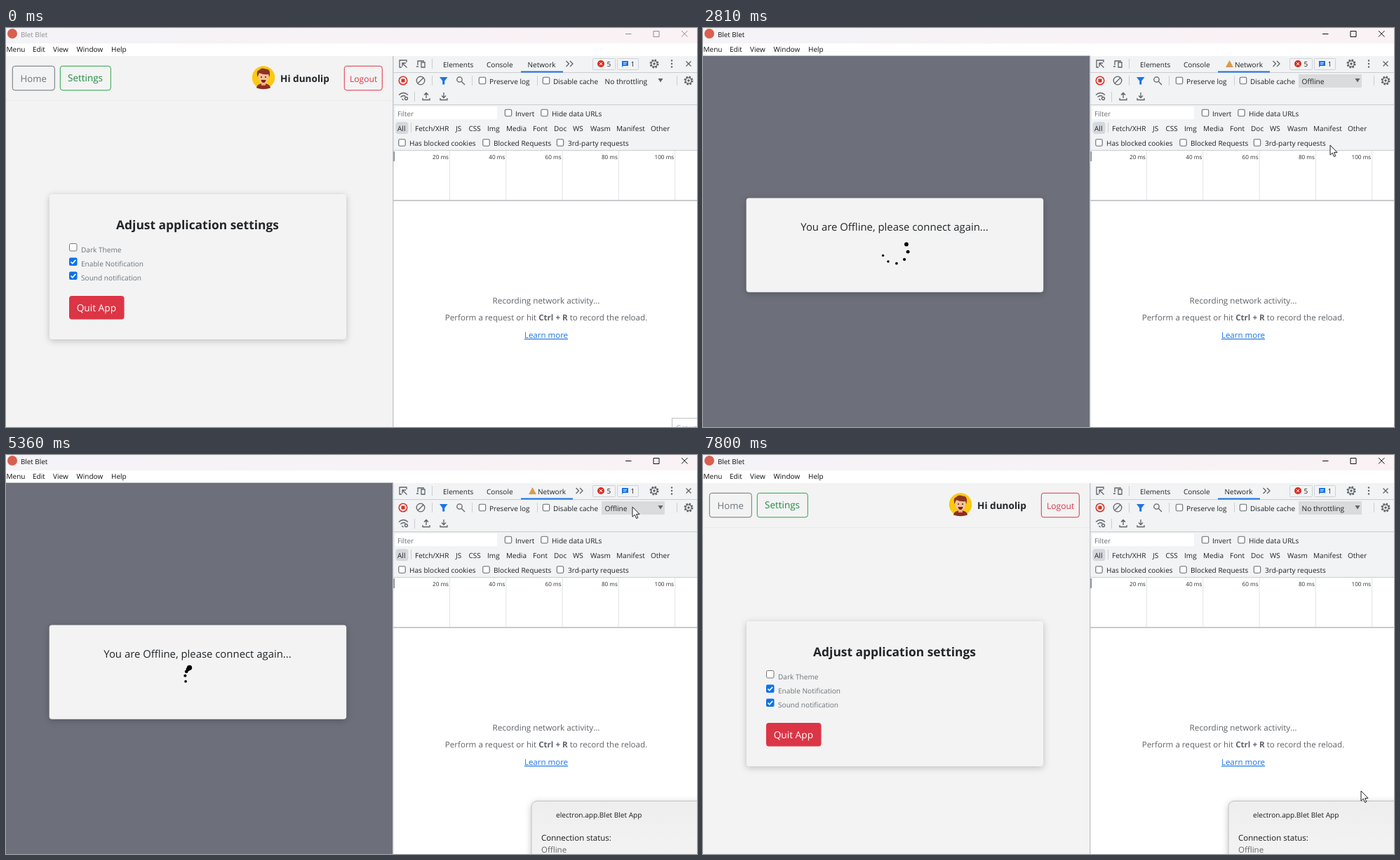
An HTML page that plays this animation: 985x569 px, repeating every 8000 ms.

```html
<!DOCTYPE html>
<html lang="en">
<head>
<meta charset="utf-8">
<title>Offline settings</title>
<style>
  html, body { margin: 0; width: 100%; height: 100%; overflow: hidden; background: #fff; }
  svg { display: block; width: 100vw; height: 100vh; }
  text { font-family: "Open Sans", "Noto Sans", sans-serif; text-rendering: geometricPrecision; white-space: pre; }
  .line { fill: none; stroke: #5f6368; stroke-width: 1.3; }
  .soft { filter: drop-shadow(0 2px 5px rgba(0, 0, 0, .22)); }
  .pop { filter: drop-shadow(0 11px 13px rgba(0, 0, 0, .27)); }
</style>
</head>
<body>
<svg id="stage" viewBox="0 0 985 569"></svg>
<script>
const LOOP = 8000;
const RED = '#dc3545', BLUE = '#1a73e8', INK = '#202124', GREY = '#5f6368';

const text = (x, y, size, str, fill = INK, extra = '') =>
  `<text x="${x}" y="${y}" font-size="${size}" fill="${fill}" ${extra}>${str}</text>`;
const rect = (x, y, w, h, fill, extra = '') =>
  `<rect x="${x}" y="${y}" width="${w}" height="${h}" fill="${fill}" ${extra}/>`;
const path = (d, extra = 'class="line"') => `<path d="${d}" ${extra}/>`;
const circle = (x, y, r, extra = 'class="line"') => `<circle cx="${x}" cy="${y}" r="${r}" ${extra}/>`;
const group = (id, body) => `<g id="${id}">${body}</g>`;
const BOLD = 'font-weight="700"', MID = 'text-anchor="middle"';

const button = (x, w, color) => rect(x + .3, 54.3, w, 34.5, 'none', `rx="3.5" stroke="${color}"`);
const box = (x, y, extra = '') => rect(x - 4.7, y - 4.7, 9.4, 9.4, '#fff', `rx="1.6" stroke="#666b70" stroke-width="1.1" ${extra}`);
const ticked = y => rect(90, y, 11.5, 11.5, '#0d72ea', 'rx="2"') +
  path(`M92.5 ${y + 6}l2.3 2.4l4.4 -5`, 'fill="none" stroke="#fff" stroke-width="1.6"');
const separator = (x, y) => rect(x, y - 7, 1, 14, '#cbcdd1');
const gear = (x, y) => circle(x, y, 5.4, `fill="none" stroke="${GREY}" stroke-width="2.2" stroke-dasharray="2.4 1.84"`) +
  circle(x, y, 4.2) + circle(x, y, 1.7, `fill="${GREY}"`);

function titleBar() {
  const menu = [['Menu', .5], ['Edit', 38], ['View', 67], ['Window', 100.5], ['Help', 150]];
  return rect(0, 0, 985, 22, 'url(#mica)') + rect(0, 22, 985, 18, '#fff') +
    circle(9, 8, 7, 'fill="#d9604f"') +
    group('caption', text(21, 12.5, 9.8, 'Blet Blet', 'currentColor') +
      path('M883 8.5h8.5M923 4.5h8v8h-8zM963 4l8.5 8.5m0-8.5l-8.5 8.5', 'fill="none" stroke="currentColor"')) +
    menu.map(([s, x]) => text(x, 34.3, 10, s, '#111')).join('');
}

function avatar() {
  return '<g transform="translate(367 71)">' + circle(0, -.5, 16.2, 'fill="#fbc90e"') +
    path('M-10 14.5Q-9 8 0 8T10 14.5Q0 18 -10 14.5Z', 'fill="#8f2d22"') +
    rect(-3, 4, 6, 7, '#e5a276') +
    path('M-7.5 -6Q-8 8 0 9Q8 8 7.5 -6Z', 'fill="#f6c29a"') +
    path('M-8.5 -1Q-11 -10 -6 -11Q-3 -15 3 -12.5Q11 -13 8.5 -1L7 -5Q0 -4 -6 -7Z', 'fill="#8c3422"') +
    circle(-3, -1, 1, 'fill="#4a261d"') + circle(3, -1, 1, 'fill="#4a261d"') +
    path('M-3.5 3H3.5Q3 7 0 7T-3.5 3Z', 'fill="#7c1f1c"') + '</g>';
}

function settingsPage() {
  const label = (y, s) => text(107, y, 10.1, s, '#6c757d');
  return rect(0, 40, 552, 529, '#f3f3f3') + rect(0, 103, 552, 1, '#eaeaea') +
    button(9, 60, '#6c757d') + text(20.5, 77, 13.2, 'Home', '#6c757d') +
    button(77, 72, '#28a745') + text(88, 76, 13.5, 'Settings', '#218a45') +
    avatar() + text(391, 76.5, 13.6, 'Hi dunolip', '#212529', BOLD) +
    button(482, 54, RED) + text(490, 77, 12.1, 'Logout', RED) +
    rect(62, 237, 423, 207, '#f3f3f3', 'rx="4" class="soft"') +
    text(273, 286.5, 17.4, 'Adjust application settings', '#212529', `${BOLD} ${MID}`) +
    rect(90.5, 307.5, 10.5, 10.5, '#fff', 'rx="2" stroke="#767676"') + ticked(327.5) + ticked(347.5) +
    label(319.5, 'Dark Theme') + label(340, 'Enable Notification') + label(360, 'Sound notification') +
    rect(90, 382, 78.5, 33.5, RED, 'rx="4"') + text(100.7, 404, 13.7, 'Quit App', '#fff');
}

function offlinePage() {
  const dots = Array.from({ length: 6 }, () => circle(0, 0, 2, 'class="dot"')).join('');
  return rect(0, 39.6, 552, 530, '#6d6f7b') +
    rect(61.7, 242.5, 423.5, 134.3, '#f3f3f3', 'rx="4" class="soft"') +
    text(273, 288.5, 14.9, 'You are Offline, please connect again...', '#212529', MID) + dots;
}

function devtools() {
  const row = (y, items) => items.map(([x, s]) => text(x, y, 10.05, s)).join('');
  const ticks = [20, 40, 60, 80, 100].map((ms, i) =>
    rect(632 + i * 80.3, 175, 1, 70, '#e2e3e5') + text(631 + i * 80.3, 187, 8.2, ms + ' ms', '#303134', 'text-anchor="end"'));
  const chevrons = x => path('M0 -4l4 4l-4 4M5.5 -4l4 4l-4 4', `class="line" transform="translate(${x} 51)"`);
  return rect(552, 40, 433, 529, '#fff') + rect(552, 40, 433, 135, '#f1f3f4') +
    rect(552, 63, 433, 1, '#cacdd1') + rect(552, 109, 433, 1, '#cacdd1') + rect(552, 174, 433, 1, '#cacdd1') +
    // tab strip
    path('M571 49v-3h-10v10h3M565 50l6.5 6.5M565 55v-5h5') +
    path('M588 55h-3M587 53v-6h9M592 49h5v7h-5z') + separator(607, 51) +
    row(55.5, [[623, 'Elements'], [685, 'Console']]) +
    group('tabOnline', text(743.5, 55.5, 10.05, 'Network') + rect(734, 61.5, 60, 2, BLUE) + chevrons(798.5)) +
    group('tabOffline', path('M750.5 46l5.5 10h-11z', 'fill="#dd9a4c"') + text(758, 55.5, 10.05, 'Network') +
      rect(734, 61.5, 74, 2, BLUE) + chevrons(812.5)) +
    rect(836.5, 43.5, 32, 16, 'none', 'rx="1" stroke="#cdd2d8"') + circle(848, 51, 5, 'fill="#d93025"') +
    path('M846 49l4 4m0-4l-4 4', 'stroke="#fff"') + text(856.5, 55, 10, '5') +
    rect(871.5, 43.5, 30, 16, 'none', 'rx="1" stroke="#cdd2d8"') + path('M878 47h9v7h-7l-2 2z', `fill="${BLUE}"`) +
    path('M880 49.5h5m-5 2h4', 'stroke="#fff" stroke-width=".8"') + text(890.5, 55, 10, '1') +
    gear(924, 51) + [46.5, 51, 55.5].map(y => circle(949, y, 1.2, `fill="${GREY}"`)).join('') + path('M969.5 47.5l7 7m0-7l-7 7') +
    // network toolbar
    circle(566, 75, 5.8, 'fill="none" stroke="#d93025" stroke-width="1.5"') + rect(563.5, 72.5, 5, 5, '#d93025') +
    circle(591, 75, 5.8) + path('M587 79l8-8') + separator(607, 75) +
    path('M618 70h11.5l-4.3 5.5v5h-3v-5z', `fill="${BLUE}"`) + circle(646.5, 73.5, 3.7) + path('M649.5 76.5l4.5 4.5') +
    separator(664, 75) + box(679, 75) + separator(757, 75) + box(770, 75) + row(79.5, [[689, 'Preserve log'], [780, 'Disable cache']]) +
    rect(849, 66, 90, 19, '#d9dbdd', 'id="selectBg"') + text(853.5, 79.5, 10.2, '', INK, 'id="selectText"') +
    path('M929.5 72h7l-3.5 5.5z', `fill="${GREY}"`) + separator(956, 75) + gear(973, 75) +
    path('M560 95.5q6.5-6 13 0M562.5 98.5q4-3.5 7 -1M564.5 101l2 2') + circle(570.5, 100.5, 2) +
    separator(582, 98) + path('M599 100v-7.5m-3 3l3-3l3 3M594 100v2.5h10v-2.5') + path('M624 92v7.5m-3-3l3 3l3-3M619 100v2.5h10v-2.5') +
    // filters
    rect(555, 112, 145, 18, '#fff') + text(558, 125.5, 9.9, 'Filter', '#6b6f73') +
    box(716, 121) + box(767.5, 121) + row(125.5, [[726, 'Invert'], [778, 'Hide data URLs']]) +
    rect(555.5, 134, 18, 17, '#d5d8dc', 'rx="4"') + separator(577, 142) +
    row(146.5, [[558, 'All'], [583, 'Fetch/XHR'], [641, 'JS'], [659.5, 'CSS'], [686, 'Img'], [713, 'Media'], [751, 'Font'],
      [781, 'Doc'], [808, 'WS'], [833, 'Wasm'], [870, 'Manifest'], [919, 'Other']]) +
    box(564.5, 163.5) + box(684.5, 163.5) + box(790, 163.5, 'id="thirdParty"') +
    row(167.5, [[575, 'Has blocked cookies'], [695, 'Blocked Requests'], [801, '3rd-party requests']]) +
    // timeline and empty state
    ticks.join('') + rect(552, 245, 433, 2, '#c8cacd') + rect(552, 176, 2, 14, '#80868b') +
    text(770, 392.5, 11.7, 'Recording network activity…', GREY, MID) +
    text(770, 417, 11.6, `Perform a request or hit <tspan ${BOLD}>Ctrl + R</tspan> to record the reload.`, GREY, MID) +
    text(770, 442, 11.5, 'Learn more', BLUE, MID + ' text-decoration="underline"') +
    rect(551, 40, 1.5, 529, '#c6c9cd');
}

const options = ['Disabled', 'No throttling', 'Presets', 'Fast 3G', 'Slow 3G', 'Offline', 'Custom', 'Add...'];
const headings = [0, 2, 6];

function popup() {
  const items = options.map((s, i) => headings.includes(i)
    ? text(855, 97 + i * 15, 9.9, s, '#111', BOLD)
    : text(871, 97 + i * 15, 10.1, s, '#333', 'class="option"'));
  return rect(849, 85.5, 89.5, 120.5, '#fff', 'rx="7" stroke="#b5b7ba" class="pop"') +
    rect(849, 0, 89.5, 15.5, '#1e90ff', 'id="hoverRow"') + items.join('');
}

function toast() {
  return rect(749, 493.5, 260, 100, 'url(#toastFill)', 'rx="8" stroke="#c2c2c2" class="soft"') +
    text(784, 517, 10.1, 'electron.app.Blet Blet App', '#1b1b1b') +
    text(763, 550, 11.5, 'Connection status:', '#1b1b1b') + text(763, 567, 11.5, 'Offline', '#666');
}

document.getElementById('stage').innerHTML =
  `<defs><linearGradient id="mica"><stop stop-color="#f4f3f7"/><stop offset="1" stop-color="#faf2f5"/></linearGradient>
   <linearGradient id="toastFill" x2="0" y2="1"><stop stop-color="#eeeeef"/><stop offset="1" stop-color="#f4f4f4"/></linearGradient></defs>` +
  titleBar() + settingsPage() + group('offline', offlinePage()) + devtools() + group('popup', popup()) + group('toast', toast()) +
  group('hint', rect(949.5, 556.5, 60, 30, '#fff', 'stroke="#bfbfbf"') + text(955, 574, 10.5, 'Groups', '#999')) +
  circle(-1, 0, 10, 'id="click" fill="#ecd92c" fill-opacity=".8"') +
  path('M0 0V14.2L3.3 11.2L5.6 16.5L7.8 15.6L5.6 10.4H10Z', 'id="cursor" fill="#fff" stroke="#222"');

const el = Object.fromEntries([...document.querySelectorAll('[id]')].map(e => [e.id, e]));
const dots = [...document.querySelectorAll('.dot')];
const optionLabels = [...document.querySelectorAll('.option')];
const show = (node, on) => { node.style.display = on ? '' : 'none'; };
const within = (t, ...spans) => spans.some(([a, b]) => t >= a && t < b);

// time, x, y of the pointer tip
const route = [
  [270, 936, 556], [450, 920, 430], [640, 893, 270], [800, 881, 162], [930, 879, 95], [1060, 879, 71],
  [1320, 879, 71], [1450, 884, 72], [2010, 884, 72], [2180, 889, 122], [2350, 894, 167],
  [4600, 894, 167], [4800, 902, 138], [5020, 895, 98], [5300, 893, 74],
  [5640, 893, 74], [5890, 891, 109], [6630, 891, 109], [6800, 882, 160], [7000, 886, 235],
  [7200, 905, 335], [7390, 920, 395], [7450, 922, 401], [7800, 938, 479], [LOOP, 938, 479]
];

function pointerAt(t) {
  if (t <= route[0][0]) return route[0].slice(1);
  const i = route.findIndex(p => p[0] > t);
  const [a, b] = [route[i - 1], route[i]];
  const k = (t - a[0]) / (b[0] - a[0]);
  return [1, 2].map(n => a[n] + (b[n] - a[n]) * k);
}

// Dots bunch up and spread out while the whole ring turns steadily.
function spin(t) {
  const since = t - 2810;
  const turn = 250 + .133 * since;
  dots.forEach((dot, i) => {
    const p = .49 + since / 1932 + (i - 2.5) * .055;
    const eased = p - Math.sin(2 * Math.PI * p) / (2 * Math.PI);
    const a = (turn + 360 * eased) * Math.PI / 180;
    dot.setAttribute('cx', 273.7 + 18.5 * Math.cos(a));
    dot.setAttribute('cy', 317.3 + 18.5 * Math.sin(a));
    dot.setAttribute('r', 2.9 + 1.2 * Math.cos(2 * Math.PI * (p - .1)));
  });
}

function render(t) {
  const [x, y] = pointerAt(t);
  const offline = within(t, [2670, 6160]);
  const open = within(t, [1590, 2670], [5560, 6160]);

  el.caption.style.color = t < 70 ? '#8d8d8d' : '#111';
  show(el.hint, t < 70);
  show(el.offline, within(t, [2740, 6290]));
  show(el.tabOnline, !offline);
  show(el.tabOffline, offline);
  show(el.selectBg, t >= 1590);
  el.selectText.textContent = offline ? 'Offline' : 'No throttling';
  el.thirdParty.setAttribute('stroke', x < 888 && y > 155 && y < 171 ? '#202124' : '#666b70');

  show(el.popup, open);
  if (open) {
    let row = y < 101 ? (offline ? 5 : 1) : Math.floor((y - 86) / 15);
    if (headings.includes(row)) row--;
    el.hoverRow.setAttribute('y', 85.5 + row * 15);
    optionLabels.forEach(o => o.setAttribute('fill', o.textContent === options[row] ? '#fff' : '#333'));
  }

  show(el.toast, t >= 3050);
  const left = 1 - Math.min(1, Math.max(0, (t - 3050) / 340));
  el.toast.setAttribute('transform', `translate(${240 * left ** 3} 0)`);

  show(el.click, within(t, [1590, 1700], [2610, 2740], [5500, 5620], [6090, 6220]));
  el.click.setAttribute('transform', `translate(${x} ${y})`);
  show(el.cursor, t >= 270);
  el.cursor.setAttribute('transform', `translate(${x} ${y})`);
  spin(t);
}

const start = performance.now();
function frame() {
  render((performance.now() - start) % LOOP);
  requestAnimationFrame(frame);
}
frame();
</script>
</body>
</html>
```
